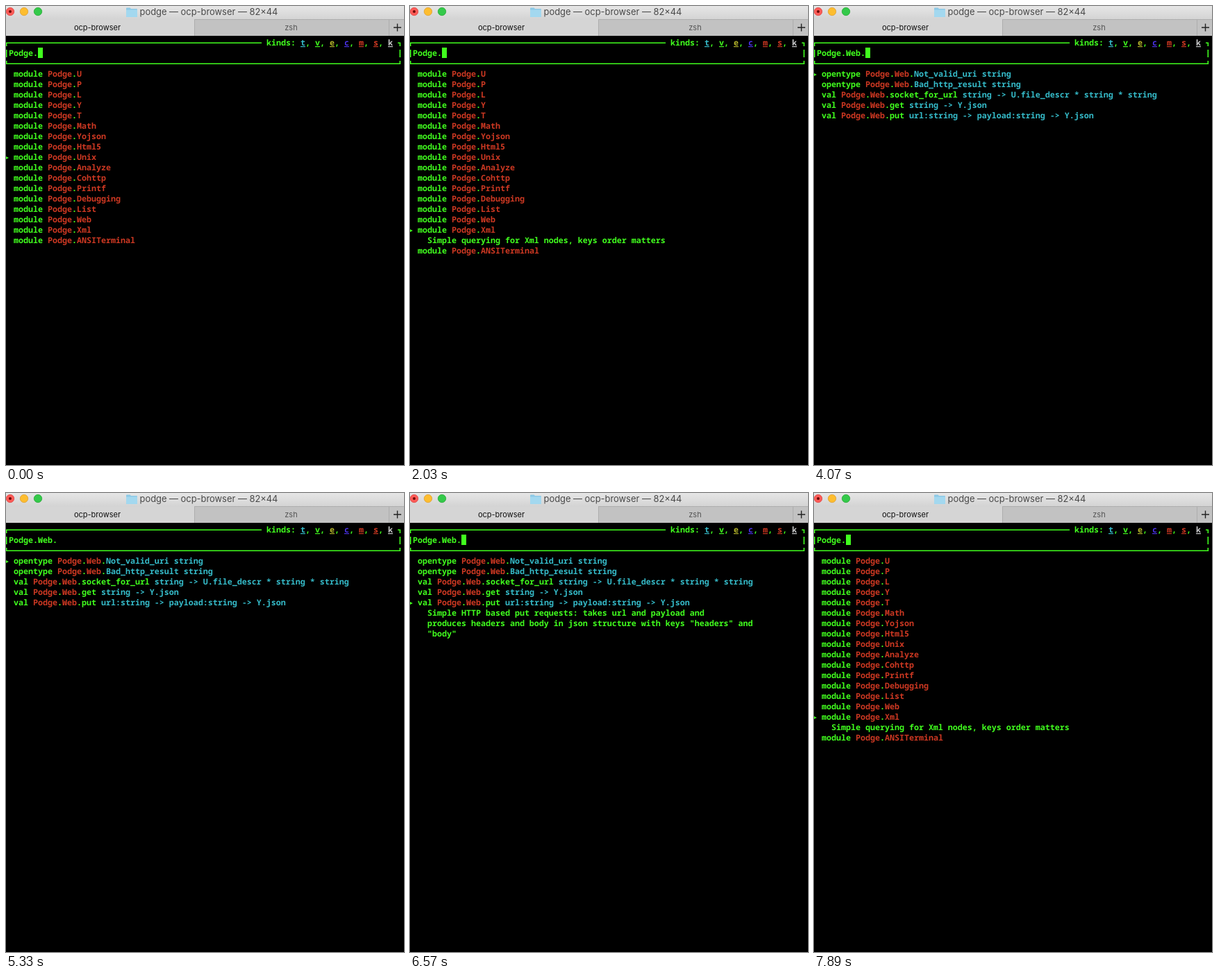
Write an HTML page that moves like this. It is 573 px wide and 662 px high and loops after 8 s.

```html
<!DOCTYPE html>
<html lang="en">
<head>
<meta charset="utf-8">
<title>Terminal module browser</title>
<style>
  html, body { margin: 0; width: 100%; height: 100%; overflow: hidden; background: #000; }
  svg { display: block; width: 100vw; height: 100vh; }
  text { white-space: pre; }
  .ui { font-family: Inter, "Open Sans", sans-serif; }
  .mono {
    font: 600 11.667px "Noto Sans Mono", "DejaVu Sans Mono", monospace;
    font-variant-ligatures: none;
    text-rendering: geometricPrecision;
  }
  .heavy { font-weight: 800; }
</style>
</head>
<body>
<svg id="stage" viewBox="0 0 573 662" xmlns="http://www.w3.org/2000/svg">
  <defs>
    <linearGradient id="bar" x1="0" y1="0" x2="0" y2="1">
      <stop offset="0" stop-color="#e6e6e6"/>
      <stop offset="1" stop-color="#d3d3d3"/>
    </linearGradient>
  </defs>
  <rect width="573" height="662"/>

  <!-- window chrome -->
  <rect width="573" height="20" fill="url(#bar)"/>
  <rect y="20" width="271" height="23" fill="#d5d5d5"/>
  <rect x="271" y="19.5" width="302" height="23.5" fill="#c2c2c2"/>
  <path d="M271.5 20V43M551.5 20V43M271 19.5H573" stroke="#adadad" fill="none"/>
  <g stroke-width=".8">
    <circle cx="6" cy="8" r="5.7" fill="#fc5b57" stroke="#df4744"/>
    <circle cx="26" cy="8" r="5.7" fill="#fdbd2f" stroke="#dea034"/>
    <circle cx="46" cy="8" r="5.7" fill="#34c94a" stroke="#27aa35"/>
  </g>
  <circle cx="6" cy="8" r="2" fill="#6b0a06"/>
  <path d="M173 3.5q0-1 1-1h4.5l1.5 1.5h8q1 0 1 1v10q0 1-1 1h-14q-1 0-1-1z" fill="#8cc9e6"/>
  <path d="M173 5.5h16v9.5q0 1-1 1h-14q-1 0-1-1z" fill="#a3d8ef"/>
  <g class="ui" text-anchor="middle">
    <text x="292" y="13" font-size="12.9" fill="#484848">podge — ocp-browser — 82×44</text>
    <text x="131.5" y="35" font-size="11" fill="#111">ocp-browser</text>
    <text x="410.5" y="35" font-size="11" fill="#555">zsh</text>
  </g>
  <path d="M558 31H569M563.5 25.5V36.5" stroke="#222" stroke-width="1.4"/>

  <!-- input frame -->
  <path d="M.7 58V53.3H368M564 53.3H567.3V58M.7 63V74M567.3 63V74M.7 79V83.3H567.3V79"
        fill="none" stroke="#41ff1e" stroke-width="1.6"/>
  <g id="screen" class="mono"></g>
  <rect id="cursor" y="60" width="7" height="15" fill="#41ff1e"/>
  <path id="arrow" d="M0 -2L4 0L0 2Z" fill="#41ff1e"/>
</svg>
<script>
const LOOP = 8000, CELL = 7, LINE = 15, LEFT = 4;
const GREEN = '#41ff1e', RED = '#cd3822', CYAN = '#35bbc9';
const $ = id => document.getElementById(id);
const screen = $('screen'), cursor = $('cursor'), arrow = $('arrow');

function make(name, attrs, parent) {
  const node = document.createElementNS('http://www.w3.org/2000/svg', name);
  for (const key in attrs) node.setAttribute(key, attrs[key]);
  parent.append(node);
  return node;
}

// A line is a list of [colour, text, extra attributes].
function drawLine(col, y, spans, parent) {
  const line = make('text', { x: LEFT + col * CELL, y }, parent);
  for (const [fill, text, extra] of spans)
    make('tspan', { fill, ...extra }, line).textContent = text;
}

const heavy = { class: 'heavy' };
const dot = [GREEN, '.', heavy];
const path = (...names) => names.flatMap(name => [[RED, name], dot]);

const moduleItem = name => ({
  spans: [[GREEN, 'module '], ...path('Podge'), [RED, name]],
  doc: name === 'Xml' ? ['Simple querying for Xml nodes, keys order matters'] : []
});
const openItem = name => ({
  spans: [[GREEN, 'opentype '], ...path('Podge', 'Web'), [CYAN, name + ' string']],
  doc: []
});
const valItem = (name, type, ...doc) => ({
  spans: [[GREEN, 'val '], ...path('Podge', 'Web'), [GREEN, name, heavy], [CYAN, ' ' + type]],
  doc
});

const root = {
  query: 'Podge.',
  items: ('U P L Y T Math Yojson Html5 Unix Analyze Cohttp Printf ' +
    'Debugging List Web Xml ANSITerminal').split(' ').map(moduleItem)
};
const web = {
  query: 'Podge.Web.',
  items: [
    openItem('Not_valid_uri'),
    openItem('Bad_http_result'),
    valItem('socket_for_url', 'string -> U.file_descr * string * string',
      'Produces a socket ready for HTTP requests and returns the',
      'socket, host and querystring'),
    valItem('get', 'string -> Y.json',
      'Simple HTTP based get request: produces headers and body in json',
      'structure with keys "headers" and "body"'),
    valItem('put', 'url:string -> payload:string -> Y.json',
      'Simple HTTP based put requests: takes url and payload and',
      'produces headers and body in json structure with keys "headers" and',
      '"body"')
  ]
};

// [start ms, page, selected item, documentation open, cursor hidden]
const steps = [
  [0, root, 8], [60, root, 9], [120, root, 10], [540, root, 11], [660, root, 12],
  [840, root, 13], [960, root, 14], [1130, root, 15], [1310, root, 16],
  [2030, root, 15, true], [3050, root, 14], [4010, root, 14, false, true],
  [4070, web, 0], [5330, web, 0, false, true], [5510, web, 1],
  [5680, web, 2, true], [5800, web, 3, true], [6340, web, 3, true, true],
  [6570, web, 4, true], [7170, root, 14], [7890, root, 15, true]
];

const kinds = [['t', CYAN], ['v', GREEN], ['e', '#b5b52b'], ['c', '#4b32e8'],
  ['m', RED], ['s', RED], ['k', '#cbcccd']];

function drawScreen([, page, selected, open, hidden]) {
  screen.replaceChildren();
  const legend = kinds.flatMap(([key, fill], i) => [
    [GREEN, i ? ', ' : 'kinds: '],
    [fill, key, { 'text-decoration': 'underline', class: key === 'v' ? 'heavy' : '' }]
  ]);
  drawLine(53, 57, legend, screen);
  drawLine(0, 72, [[GREEN, page.query]], screen);
  cursor.setAttribute('x', LEFT + page.query.length * CELL);
  cursor.setAttribute('visibility', hidden ? 'hidden' : 'visible');

  let y = 102;
  page.items.forEach((item, i) => {
    drawLine(1, y, item.spans, screen);
    if (i === selected) arrow.setAttribute('transform', `translate(0 ${y - 3})`);
    y += LINE;
    if (i !== selected || !open) return;
    for (const text of item.doc) {
      drawLine(3, y, [[GREEN, text]], screen);
      y += LINE;
    }
  });
}

let shown;
function render(ms) {
  const step = steps.findLast(([start]) => start <= ms);
  if (step !== shown) drawScreen(shown = step);
}

const began = performance.now();
function tick() {
  render((performance.now() - began) % LOOP);
  requestAnimationFrame(tick);
}
tick();
</script>
</body>
</html>
```
